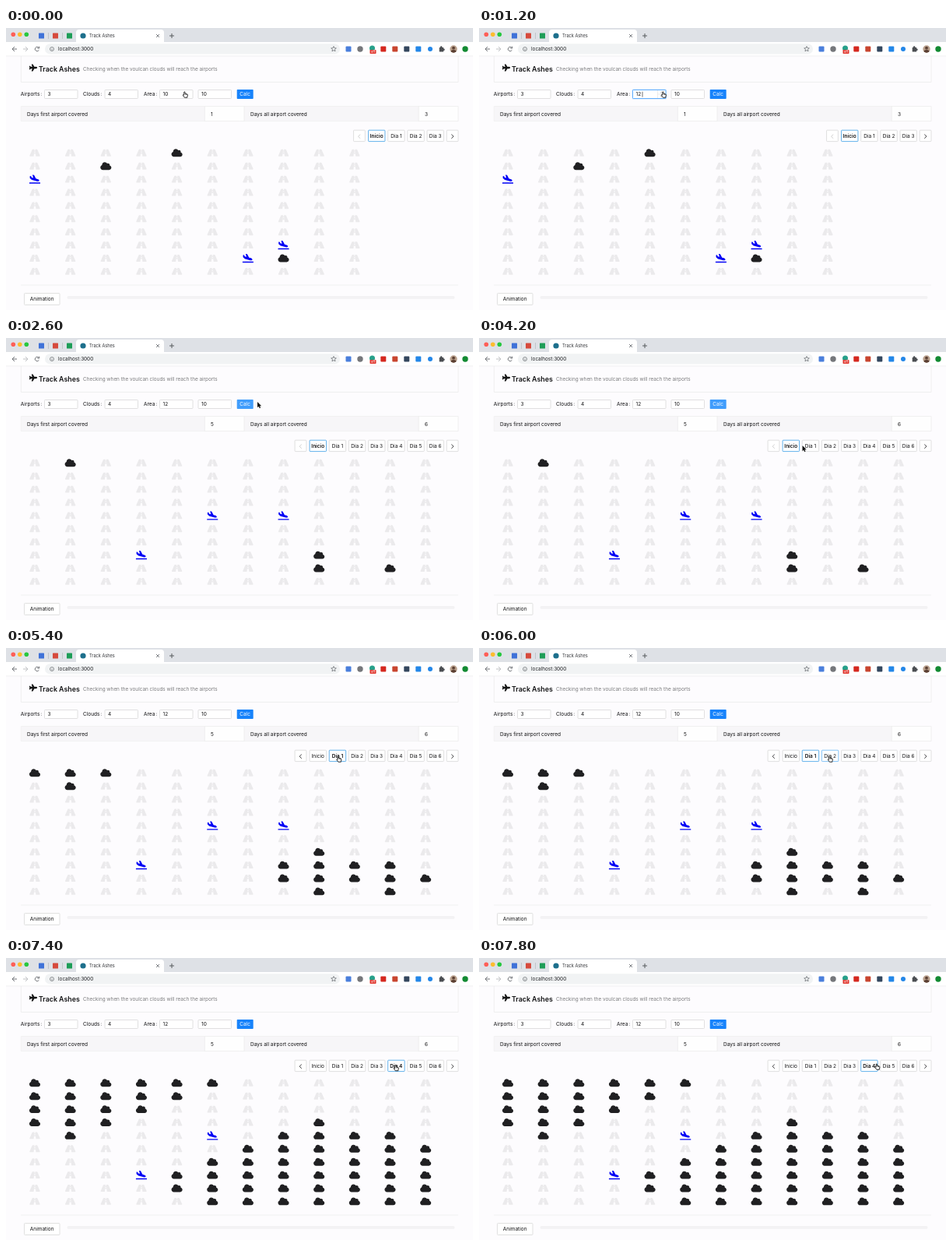
An HTML page with a canvas for the animation above (8000 ms loop, 600 by 362 pixels).

```html
<!DOCTYPE html>
<html lang="en">
<head>
<meta charset="utf-8">
<title>Track Ashes</title>
<style>
html, body { margin: 0; width: 100%; height: 100%; overflow: hidden; background: #fdfcfe; }
canvas { display: block; width: 600px; height: 362px; }
</style>
</head>
<body>
<canvas id="stage"></canvas>
<script>
const W = 600, H = 362, LOOP = 8000, STEP = 200;
const canvas = document.getElementById('stage');
const ctx = canvas.getContext('2d');
const dpr = window.devicePixelRatio || 1;
canvas.width = W * dpr;
canvas.height = H * dpr;

const INK = '#101012', LINE = '#d9d9d9', SOFT = '#ececec', BLUE = '#1783fb', SKY = '#409dfc';
const NAME = 'Track Ashes';

const ICONS = {
  cloud: [640, 512, 'M537.6 226.6c4-11 6.4-22 6.4-34.6c0-53-43-96-96-96c-20 0-38 6-53.3 16.2C367 64 315 32 256 32c-88 0-160 72-160 160v8C40 220 0 273 0 336c0 80 64 144 144 144h368c71 0 128-57 128-128c0-62-44-114-102.4-125.4z'],
  road: [576, 512, 'M143 83Q151 64 170 64H268L227 448H31Q-8 448 3 403ZM433 83Q425 64 406 64H308L349 448H545Q584 448 573 403ZM268 128H308L320 192H256ZM262 224H314L328 304H248Z'],
  landing: [640, 512, 'M16 448H624Q640 448 640 464V496Q640 512 624 512H16Q0 512 0 496V464Q0 448 16 448ZM45 206L134 286Q145 296 159 300L447 378C473 385 501 387 528 379C557 371 571 358 575 344C579 329 573 311 551 289C532 269 507 256 481 249L383 222L283 30Q280 21 271 18L206 1Q185 -1 185 17L233 181L131 153L103 86Q100 78 92 76L53 65Q32 62 32 81V182Q33 196 45 206Z'],
  plane: [576, 512, 'M480 192H366L261 8Q256 0 247 0H181Q163 2 166 20L215 192H112L69 134Q64 128 56 128H16Q-2 130 0 148L32 256L0 364Q-2 382 16 384H56Q64 384 69 378L112 320H215L166 492Q163 510 181 512H247Q256 512 261 504L366 320H480C515 320 576 291 576 256S515 192 480 192Z']
};
for (const k in ICONS) ICONS[k][2] = new Path2D(ICONS[k][2]);

const HAND = new Path2D('M2 .8Q2.8 0 3.5 .9V3.2L6.6 4Q7.5 4.3 7.3 5.3L6.7 7.7V8.8H2.7L.4 5.7Q.1 4.6 1.2 4.7L2 5.3Z');
const ARROW = new Path2D('M0 0V7.2L1.7 5.7L2.8 8.2L4.1 7.6L3 5.2H5.2Z');

// time, x, y, hand?
const CURSOR = [
  [0, 227, 81.5, 1], [200, 231, 82, 1], [400, 234, 81.5, 1], [1400, 234, 81.5, 0],
  [1800, 300, 83, 1], [2200, 306, 83, 1], [2400, 315, 82, 0], [2600, 323, 82, 0],
  [3000, 325, 84, 0], [3600, 378, 140, 0], [3800, 398, 147, 0], [4200, 415.5, 138, 0],
  [4400, 422, 138.5, 1], [5400, 424.5, 138.5, 1], [5800, 428, 138.5, 1], [6000, 448, 138.5, 1],
  [6400, 451, 138.5, 1], [6800, 473.5, 137.5, 1], [7100, 475, 137.5, 1], [7400, 498, 137, 1],
  [7600, 501, 136.5, 1], [7800, 508.5, 135.5, 1]
];

const CALC_AT = 2200;
const DAYS_AT = [4800, 6200, 7000, 7400];
const BEFORE = { cols: 10, days: 3, first: 1, clouds: [[4, 0], [2, 1], [7, 8]], ports: [[0, 2], [7, 7], [6, 8]] };
const AFTER = { cols: 12, days: 6, first: 5, clouds: [[1, 0], [8, 7], [8, 8], [10, 8]], ports: [[5, 4], [7, 4], [3, 7]] };

function rect(x, y, w, h, fill, stroke, r = 0) {
  ctx.beginPath();
  ctx.roundRect(x, y, w, h, r);
  if (fill) { ctx.fillStyle = fill; ctx.fill(); }
  if (stroke) { ctx.strokeStyle = stroke; ctx.lineWidth = 0.8; ctx.stroke(); }
}

function dot(x, y, r, fill) {
  ctx.beginPath();
  ctx.arc(x, y, r, 0, 7);
  ctx.fillStyle = fill;
  ctx.fill();
}

function path(points, color, width = 0.9) {
  ctx.beginPath();
  for (let i = 0; i < points.length; i += 2) ctx.lineTo(points[i], points[i + 1]);
  ctx.strokeStyle = color;
  ctx.lineWidth = width;
  ctx.stroke();
}

function text(s, x, y, { size = 6.5, color = INK, weight = 400, align = 'left' } = {}) {
  ctx.font = `${weight} ${size}px Inter, "Liberation Sans", sans-serif`;
  ctx.textAlign = align;
  ctx.fillStyle = color;
  ctx.fillText(s, x, y);
}

function label(s, x) {
  text(s, x, 87.3);
  text(':', x + ctx.measureText(s).width + 0.9, 87.3);
}

function icon(name, cx, cy, width, color) {
  const [w, h, shape] = ICONS[name], k = width / w;
  ctx.save();
  ctx.translate(cx - width / 2, cy - h * k / 2);
  ctx.scale(k, k);
  ctx.fillStyle = color;
  ctx.fill(shape, 'evenodd');
  ctx.restore();
}

function star(cx, cy, r) {
  ctx.beginPath();
  for (let i = 0; i < 10; i++) {
    const a = i * Math.PI / 5 - Math.PI / 2, d = i % 2 ? r * 0.45 : r;
    ctx.lineTo(cx + d * Math.cos(a), cy + d * Math.sin(a));
  }
  ctx.closePath();
  ctx.strokeStyle = '#5f6368';
  ctx.lineWidth = 0.7;
  ctx.stroke();
}

function browser() {
  rect(0, 0, W, 18.5, '#dee1e6');
  ['#ff5f57', '#febc2e', '#28c840'].forEach((c, i) => dot(9.3 + i * 8.5, 8.2, 2.8, c));
  ['#3f72d8', '#d64a3c', '#1e9d57'].forEach((c, i) => {
    rect(42 + i * 18, 6.5, 7, 7, c, null, 0.6);
    if (i < 2) path([54.5 + i * 18, 6, 54.5 + i * 18, 14], '#a5a8ad', 0.5);
  });
  rect(90, 2, 113, 20, '#fff', null, 4);
  dot(99, 10, 3.6, '#1d6f8c');
  text(NAME, 107, 12.1, { size: 5.6, color: '#303236' });
  path([193, 8, 197, 12], '#5f6368', 0.8);
  path([197, 8, 193, 12], '#5f6368', 0.8);
  path([210, 10, 216, 10], '#4b4e52');
  path([213, 7, 213, 13], '#4b4e52');

  rect(0, 18, W, 18, '#fff');
  path([14, 27, 8, 27], '#5f6368');
  path([11, 24, 8, 27, 11, 30], '#5f6368');
  path([22, 27, 28, 27], '#b8babd');
  path([25, 24, 28, 27, 25, 30], '#b8babd');
  ctx.beginPath();
  ctx.arc(40, 27, 2.7, 0.5, 5.6);
  ctx.strokeStyle = '#5f6368';
  ctx.lineWidth = 0.9;
  ctx.stroke();
  path([42.7, 23.7, 42.7, 26, 40.3, 26], '#5f6368');
  rect(50, 20.3, 379, 13.2, '#f1f3f4', null, 6.6);
  ctx.beginPath();
  ctx.arc(59, 27, 2.5, 0, 7);
  ctx.lineWidth = 0.7;
  ctx.stroke();
  path([59, 26.6, 59, 28.4], '#5f6368', 0.7);
  text('localhost:3000', 67, 29.1, { size: 6.4, color: '#202124' });
  star(421, 27, 3.5);
  extensions();
}

function extensions() {
  rect(436.5, 23.5, 7, 7, '#4a7fdc', null, 1);
  dot(455, 27, 3.7, '#75777b');
  dot(470.5, 26, 3.5, '#27a08a');
  rect(467.5, 28, 8, 5, '#e0342c', null, 0.8);
  text('off', 471.5, 32, { size: 4.4, color: '#fff', align: 'center' });
  ['#d5281f', '#c8452f', '#34475e', '#2387e8'].forEach((c, i) => rect(481.3 + i * 15, 23.5, 7, 7, c, null, 1));
  dot(545, 27, 3, '#2387e8');
  rect(556.7, 25, 5.5, 5.5, '#4b4e52', null, 0.6);
  dot(559.2, 24.6, 1.3, '#4b4e52');
  dot(562.5, 27.7, 1.2, '#4b4e52');
  ctx.save();
  ctx.beginPath();
  ctx.arc(575, 27, 4.7, 0, 7);
  ctx.clip();
  rect(570, 22, 10, 10, '#b9a08c');
  dot(575, 25.7, 1.9, '#5c4033');
  dot(575, 32, 4, '#5c4033');
  ctx.restore();
  dot(590, 27, 3.7, '#128a32');
}

function input(x, value, state) {
  if (state === 2) rect(x - 1, 78.5, 44.5, 13, 'rgba(24,144,255,.2)', null, 1.5);
  rect(x, 79.5, 42.5, 11, '#fff', state ? SKY : LINE, 0.8);
  text(value, x + 4, 87.4);
  if (!state) return;
  path([x + 32, 80, x + 32, 90], LINE, 0.5);
  path([x + 32, 85, x + 42, 85], LINE, 0.5);
  path([x + 35.5, 83.4, x + 37, 82, x + 38.5, 83.4], '#8c8c8c', 0.6);
  path([x + 35.5, 86.8, x + 37, 88.2, x + 38.5, 86.8], '#8c8c8c', 0.6);
  if (state === 2) path([x + 12.5, 81.7, x + 12.5, 88.6], INK, 0.6);
}

function header() {
  rect(19.4, 30, 561.6, 39.5, null, SOFT);
  browser();
  path([0, 36, W, 36], '#e6e6e8', 0.6);
  icon('plane', 35, 51, 10.4, '#141414');
  text(NAME, 42, 55.6, { size: 8.8, weight: 600 });
  text('Checking when the voulcan clouds will reach the airports', 99, 54.9, { size: 6.4, color: '#7c7c7e' });
}

function form(t) {
  label('Airports', 18.8);
  label('Clouds', 99);
  label('Area', 177);
  input(49.5, '3', 0);
  input(127, '4', 0);
  const focus = t >= 800 && t < CALC_AT;
  input(197.5, t < 800 ? '10' : t < 1000 ? '11' : '12', focus ? 2 : t >= 200 && t < 800 ? 1 : 0);
  input(247, '10', 0);
  rect(296.7, 79, 21, 12, t >= 1800 && t < DAYS_AT[0] ? SKY : BLUE, null, 0.8);
  text('Calc', 307.2, 87.3, { color: '#fff', align: 'center' });
}

function summary(world) {
  rect(19.4, 100.6, 561.6, 19, '#fefefe', SOFT);
  rect(19.7, 101, 235.5, 18.2, '#f7f6f8');
  rect(306, 101, 224, 18.2, '#f7f6f8');
  for (const x of [255.4, 306, 530.2]) path([x, 100.6, x, 119.6], SOFT, 0.8);
  text('Days first airport covered', 27, 112.6);
  text(world.first, 263, 112.6);
  text('Days all airport covered', 314, 112.6);
  text(world.days, 538, 112.6);
}

function pager(world, day, cur) {
  const left = 541 - 25.15 * world.days;
  const arrow = (x, dir, color) => {
    rect(x, 131.2, 14.8, 14.4, '#fff', LINE, 0.8);
    const c = x + 7.4;
    path([c - dir * 1.3, 136.6, c + dir * 1.4, 139.2, c - dir * 1.3, 141.8], color, 0.8);
  };
  arrow(left - 19, -1, day ? INK : '#c4c4c4');
  arrow(566.2, 1, INK);
  for (let i = 0; i <= world.days; i++) {
    const x = left + i * 25.15;
    const over = cur.hand && cur.y > 129 && cur.x + 2 > x && cur.x + 2 < x + 21.4;
    rect(x, 131.2, 21.4, 14.4, '#fff', i === day ? '#3d9fe6' : over ? '#65b5f5' : LINE, 0.8);
    text(i ? 'Dia ' + i : 'Inicio', x + 10.7, 140.8, { align: 'center', weight: i === day ? 600 : 400 });
  }
}

function grid(world, day) {
  const near = (c, r, list, d) => list.some(p => Math.abs(p[0] - c) + Math.abs(p[1] - r) <= d);
  for (let r = 0; r < 10; r++) {
    for (let c = 0; c < world.cols; c++) {
      const x = 37 + c * 45.65, y = 160.3 + r * 16.9;
      if (near(c, r, world.clouds, day)) icon('cloud', x, y, 14.1, '#202022');
      else if (near(c, r, world.ports, 0)) icon('landing', x, y, 14.1, '#0000f5');
      else icon('road', x, y, 13.4, '#ebeaec');
    }
  }
}

function footer() {
  path([19, 330, 581, 330], SOFT, 0.8);
  rect(23.5, 340.6, 45.5, 14.8, '#fff', LINE, 0.8);
  text('Animation', 46.2, 350.4, { align: 'center' });
  rect(78.5, 344, 498, 3.8, '#f3f2f4', null, 1.9);
}

function cursorAt(t) {
  let i = CURSOR.length - 1;
  while (CURSOR[i][0] > t) i--;
  const a = CURSOR[i], b = CURSOR[i + 1] || a;
  const k = b === a ? 0 : (t - a[0]) / (b[0] - a[0]);
  return { x: a[1] + (b[1] - a[1]) * k, y: a[2] + (b[2] - a[2]) * k, hand: a[3] };
}

function pointer({ x, y, hand }) {
  ctx.save();
  ctx.translate(x, y);
  ctx.lineJoin = 'round';
  if (hand) {
    ctx.scale(0.88, 0.88);
    ctx.fillStyle = '#fff';
    ctx.fill(HAND);
    ctx.strokeStyle = '#111';
    ctx.lineWidth = 1;
    ctx.stroke(HAND);
    for (const fx of [4.5, 5.8]) path([fx, 3.8, fx, 5.2], '#111', 0.6);
  } else {
    ctx.strokeStyle = '#fff';
    ctx.lineWidth = 1.4;
    ctx.stroke(ARROW);
    ctx.fillStyle = '#111';
    ctx.fill(ARROW);
  }
  ctx.restore();
}

function draw(t) {
  const world = t < CALC_AT ? BEFORE : AFTER;
  const day = DAYS_AT.filter(at => t >= at).length;
  const cur = cursorAt(t);
  ctx.setTransform(dpr, 0, 0, dpr, 0, 0);
  rect(0, 0, W, H, '#fdfcfe');
  header();
  form(t);
  summary(world);
  pager(world, day, cur);
  grid(world, day);
  footer();
  pointer(cur);
}

const start = performance.now();
function tick() {
  const t = (performance.now() - start) % LOOP;
  draw(Math.floor(t / STEP) * STEP);
  requestAnimationFrame(tick);
}
tick();
</script>
</body>
</html>
```
